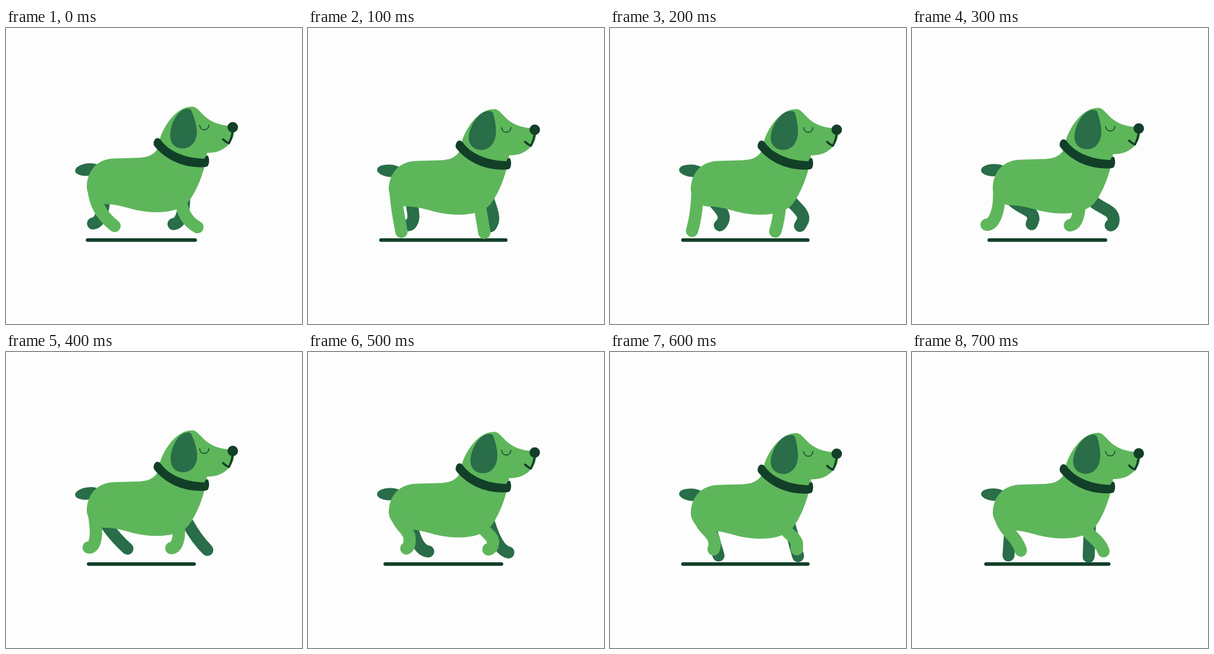
Write an HTML page that moves like this. It is 480 px wide and 480 px high and loops after 0.8 s.

```html
<!DOCTYPE html>
<html lang="en">
<head>
<meta charset="utf-8">
<title>Walking dog</title>
<style>
  html, body { margin: 0; width: 100%; height: 100%; overflow: hidden; background: #fdfdfd; }
  svg { display: block; width: 100%; height: 100%; }
  .coat { fill: #5eb65b; }
  .shade { fill: #296d49; }
  .ink { fill: #123f28; }
  .leg { fill: none; stroke-width: 20; stroke-linecap: round; stroke-linejoin: round; }
  .near { stroke: #5eb65b; }
  .far { stroke: #296d49; stroke-width: 19.5; }
  .line { fill: none; stroke: #123f28; stroke-linecap: round; stroke-linejoin: round; }
</style>
</head>
<body>
<svg viewBox="0 0 480 480">
  <path id="ground" class="line" stroke-width="5.8"/>
  <ellipse id="tail" class="shade" rx="21" ry="10"/>
  <path id="farRear" class="leg far"/>
  <path id="farFront" class="leg far"/>
  <g id="body">
    <path class="coat" d="M131 258 C131 234 145 211 178 211 L212 210 C234 210 249 202 250 178
      C255 162 274 127 302 127 C316 127 318 154 361 158 L370 163
      C372 181 356 203 326 202 L325 212 C319 238 310 263 296 281
      C280 300 240 302 206 293.5 C184 287 172 285 160 285 C147 285 132 273 131 258Z"/>
    <path id="ear" class="shade" d="M293 130.5 Q299 129.5 301 134 C306 146 310 157 310 168
      C310 185 300 195 287 195 C274 195 267 186 267 174 C267 158 275 140 286 133 Q290 131 293 130.5Z"/>
    <path class="line" stroke-width="1.5" d="M314 157 C315 167 328 167 329 157"/>
    <path class="line" stroke-width="3.4" d="M367.5 165 Q367 176 361.5 186.5 Q357 185 352 180"/>
    <circle class="ink" cx="367.7" cy="160.5" r="8.5"/>
    <path class="ink" d="M242 179.5 Q247 176 251 181 C265 201 293 211 322 211.5 Q323 206 327.5 206.5
      Q331 214 328 222 Q327 225 321 225 C288 227 258 213 240 190 Q238 185 242 179.5Z"/>
  </g>
  <path id="nearRear" class="leg near"/>
  <path id="nearFront" class="leg near"/>
</svg>
<script>
const STEP = 100;
const el = id => document.getElementById(id);

// How far the body sinks in each step of the walk.
const sink = [0.5, 4.5, 4.5, 2.5, 0, 2.5, 4.5, 4];

// Centre line of each leg, one pose per step.
const legs = {
  nearRear: [
    "M142 258 C143 285 157 306 176 321",
    "M142 258 C142 285 149 315 151.5 330.5",
    "M142 255 C142 285 138 312 133 329",
    "M142 250 L141 282 C139 300 133 319 121 319",
    "M142 255 C144 275 148 290 145 303 C143 313 140 317 134 317",
    "M143 262 C146 280 160 286 164 298 C166 308 164 317 159.5 318.5",
    "M143 265 C149 285 162 290 168 302 C171 310 170 315 168 320",
    "M143 267 C149 288 162 294 170 308 Q175 316 176.5 322"
  ],
  nearFront: [
    "M283 276 C285 300 296 315 310.5 323",
    "M278 285 L286 332",
    "M276 285 Q274 310 268 330",
    "M272 285 C271 305 266 319 256 320",
    "M280 280 C282 300 278 317 268 318",
    "M282 282 C287 294 300 298 300 308 C300 315 297 319 292.5 320",
    "M282 284 C288 296 300 299 303 310 L303 320",
    "M281 287 C288 299 304 304 310.5 323"
  ],
  farRear: [
    "M159 275 C159 295 153 316 141 317",
    "M167 280 C170 295 173 308 169 314 C167 319 164 320 161 320",
    "M165 278 C177 292 187 301 184 311 Q182 317 178 320",
    "M160 277 C176 295 197 293 197 310 L194 318",
    "M164 282 Q178 302 197 319",
    "M168 280 C172 300 180 322 195 323.5",
    "M162 280 Q168 305 176 330",
    "M160 280 L156.5 330"
  ],
  farFront: [
    "M289 275 C289 300 283 317 271.5 318",
    "M293 280 C298 295 303 308 299 316 L296 321.5",
    "M291 278 C304 293 316 301 313 312 L308 321",
    "M290 278 C306 294 327 294 327 311 C327 316 325 319 322 320",
    "M295 278 Q308 302 326.5 321",
    "M294 278 C301 300 311 322 325 325",
    "M291 280 Q298 305 305 331",
    "M288.5 280 L286.5 332"
  ]
};

function draw(time) {
  const step = Math.floor(time / STEP) % sink.length;
  const drop = sink[step];
  const reach = 85.5 + 3.5 * drop;
  el("ground").setAttribute("d", `M${219.5 - reach} 343.8H${219.5 + reach}`);
  el("body").setAttribute("transform", `translate(0 ${drop})`);
  el("ear").setAttribute("transform", `rotate(${1.9 * drop} 296 131)`);
  el("tail").setAttribute("transform",
    `translate(133 ${229.3 + 0.5 * drop}) rotate(${3 * drop - 8})`);
  for (const name in legs) el(name).setAttribute("d", legs[name][step]);
}

let start;
function tick(now) {
  start ??= now;
  draw(Math.max(0, now - start));
  requestAnimationFrame(tick);
}
draw(0);
requestAnimationFrame(tick);
</script>
</body>
</html>
```
